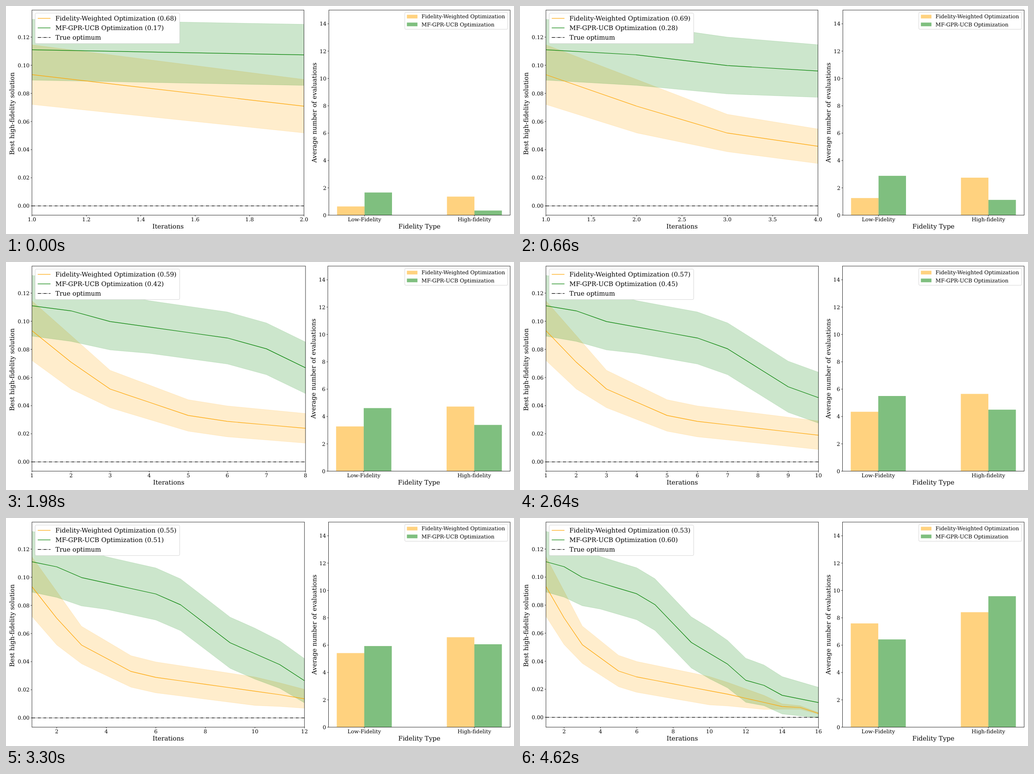
Write an HTML page that moves like this. It is 1116 by 502 pixels and loops after 6.28 s.

```html
<!DOCTYPE html>
<html lang="en">
<head>
<meta charset="utf-8">
<title>Multi-fidelity optimization</title>
<style>
  html, body { margin: 0; width: 100%; height: 100%; overflow: hidden; background: #fff; }
  svg {
    display: block; width: 1116px; height: 502px;
    font: 11.63px "DejaVu Serif", serif;
    font-variant-ligatures: none; text-rendering: geometricPrecision;
  }
  .big { font-size: 13.95px; }
  .mid { text-anchor: middle; }
  .end { text-anchor: end; }
  .axis { fill: none; stroke: #000; stroke-width: .8; }
  .box { fill: #fff; stroke: #ccc; stroke-width: .8; }
  .line { fill: none; stroke-width: 1.17; stroke-linejoin: round; }
  .band { fill-opacity: .2; stroke-opacity: .2; stroke-width: .78; }
  .bar { opacity: .5; }
  .dash { stroke: #000; stroke-dasharray: 7.44 1.86 1.16 1.86; }
</style>
</head>
<body>
<svg id="stage" viewBox="0 0 1116 502"></svg>
<script>
const STEP = 330, LOOP = 6280, LAST = 16;
const LEFT = 57, RIGHT = 1107.5, TOP = 9, BOTTOM = 460.6, EM = 11.63;
const HEIGHT = BOTTOM - TOP, MIDDLE = (TOP + BOTTOM) / 2;

// Key points by iteration: solution and its spread in 1e-4, and low-fidelity evaluations.
const series = [
  {
    name: 'Fidelity-Weighted Optimization', color: 'orange',
    mean: { 1: 933, 2: 709, 3: 518, 5: 330, 6: 288, 11: 165, 14: 77, 15: 70, 16: 28 },
    spread: { 1: 212, 2: 190, 3: 133, 5: 112, 10: 101, 13: 50, 14: 19, 16: 6 },
    low: { 2: .64, 4: 1.255, 6: 2.2, 12: 5.42, 14: 6.75, 16: 7.59 }
  },
  {
    name: 'MF-GPR-UCB Optimization', color: 'green',
    mean: { 1: 1110, 2: 1074, 3: 998, 6: 881, 7: 804, 9: 534, 11: 379, 12: 264, 13: 228, 14: 157, 16: 105 },
    spread: { 1: 216, 2: 217, 4: 187, 10: 181, 16: 109 },
    low: { 2: 1.66, 4: 2.88, 6: 3.73, 10: 5.5, 12: 5.935, 14: 6.23, 16: 6.42 }
  }
];

// Straight line between the key points on either side of n.
function at(keys, n) {
  if (n in keys) return keys[n];
  const xs = Object.keys(keys).map(Number), i = xs.findIndex(x => x > n);
  const a = xs[i - 1], b = xs[i];
  return keys[a] + (keys[b] - keys[a]) * (n - a) / (b - a);
}

const px = v => +v.toFixed(2);
const text = (x, y, str, cls = '') => `<text x="${px(x)}" y="${px(y)}" class="${cls}">${str}</text>`;
const path = (d, cls, attrs = '') => `<path d="${d}" class="${cls}" ${attrs}/>`;
const rect = (x, y, w, h, cls, attrs = '') =>
  `<rect x="${px(x)}" y="${px(y)}" width="${px(w)}" height="${px(h)}" class="${cls}" ${attrs}/>`;
const sideways = (x, y, str) =>
  `<text transform="translate(${px(x)} ${px(y)}) rotate(-90)" class="big mid">${str}</text>`;
const xTick = (x, str) => path(`M${px(x)} ${BOTTOM}v2.7`, 'axis') + text(x, 474.3, str, 'mid');
const yTick = (x, y, str) => path(`M${px(x)} ${px(y)}h-2.7`, 'axis') + text(x - 5.3, y + 4.2, str, 'end');
const frame = (x, right) => rect(x, TOP, right - x, HEIGHT, 'axis');

function xTicks(n) {
  const step = [.2, .25, .5, 1, 2].find(s => s >= (n - 1) / 9);
  const digits = step === .25 ? 2 : step < 1 ? 1 : 0;
  const ticks = [];
  for (let i = Math.ceil(1 / step); i * step <= n + 1e-6; i++) {
    ticks.push({ value: i * step, label: (i * step).toFixed(digits) });
  }
  return ticks;
}

// Half the width of a label centred on the right edge; the layout makes room for it.
function overhang(n, ticks) {
  const { value, label } = ticks[ticks.length - 1];
  if (value < n - 1e-6) return 0;
  return EM * .318 * (label.includes('.') ? label.length - .5 : label.length);
}

function linePlot(n, right, ticks) {
  const steps = Array.from({ length: n }, (_, i) => i + 1);
  const curve = (s, side) => steps.map(i => at(s.mean, i) + side * at(s.spread, i));

  // The y range holds all bands and zero, plus a 5% margin.
  const high = Math.max(...series.flatMap(s => curve(s, 1)));
  const low = Math.min(0, ...series.flatMap(s => curve(s, -1)));
  const scale = HEIGHT / (1.1 * (high - low));
  const x = v => LEFT + (v - 1) / (n - 1) * (right - LEFT);
  const y = v => BOTTOM - (v - low + .05 * (high - low)) * scale;
  const points = (s, side) => curve(s, side).map((v, i) => `${px(x(i + 1))} ${px(y(v))}`);

  let bands = '', lines = '', legend = rect(64, 15.7, 317.6, 67, 'box', 'rx="2.8"');
  series.forEach((s, i) => {
    const outline = [...points(s, 1), ...points(s, -1).reverse()].join('L');
    bands += path(`M${outline}Z`, 'band', `fill="${s.color}" stroke="${s.color}"`);
    lines += path('M' + points(s, 0).join('L'), 'line', `stroke="${s.color}"`);
    const row = 27.2 + 21 * i, share = (n - at(s.low, n)) / n;
    legend += path(`M69.7 ${row}h28`, 'line', `stroke="${s.color}"`)
      + text(108.4, row + 4.8, `${s.name} (${share.toFixed(2)})`, 'big');
  });
  lines += path(`M${LEFT} ${px(y(0))}H${px(right)}`, 'line dash');
  legend += path('M69.7 69.4h28', 'line dash') + text(108.4, 74.3, 'True optimum', 'big');

  let axes = frame(LEFT, right);
  ticks.forEach(t => axes += xTick(x(t.value), t.label));
  for (let v = 0; v <= 1200; v += 200) axes += yTick(LEFT, y(v), (v / 1e4).toFixed(2));

  return `<clipPath id="area">${rect(LEFT, TOP, right - LEFT, HEIGHT, '')}</clipPath>`
    + `<g clip-path="url(#area)">${bands}${lines}</g>` + axes + legend
    + text((LEFT + right) / 2, 490.2, 'Iterations', 'big mid')
    + sideways(18.4, MIDDLE + 2.2, 'Best high-fidelity solution');
}

function barPlot(n, left) {
  const unit = (RIGHT - left) / 1.65, width = unit / 4, perEval = HEIGHT / 15;
  const center = i => left + unit * (.325 + i);
  let bars = '', legend = rect(876, 14.2, 226.3, 37, 'box', 'rx="2.3"');
  series.forEach((s, i) => {
    const low = at(s.low, n), fill = `fill="${s.color}"`;
    [low, n - low].forEach((count, k) => {
      const h = count * perEval;
      bars += rect(center(k) + (i - 1) * width, BOTTOM - h, width, h, 'bar', fill);
    });
    const row = 23.3 + 17.2 * i;
    legend += rect(880.7, row - 4, 23.2, 8.1, 'bar', fill) + text(912.8, row + 4, s.name);
  });

  let axes = frame(left, RIGHT);
  ['Low-Fidelity', 'High-fidelity'].forEach((label, i) => axes += xTick(center(i), label));
  for (let v = 0; v <= 14; v += 2) axes += yTick(left, BOTTOM - v * perEval, v);

  return bars + axes + legend
    + text((left + RIGHT) / 2, 490.2, 'Fidelity Type', 'big mid')
    + sideways(left - 26.8, MIDDLE, 'Average number of evaluations');
}

const stage = document.getElementById('stage');
let shown = 0;

function draw(now) {
  const n = Math.min(LAST, 2 + Math.floor(now % LOOP / STEP));
  if (n !== shown) {
    shown = n;
    const ticks = xTicks(n), extra = overhang(n, ticks);
    stage.innerHTML = linePlot(n, 660.2 - .6 * extra, ticks) + barPlot(n, 705.5 + .4 * extra);
  }
  requestAnimationFrame(draw);
}
draw(performance.now());
</script>
</body>
</html>
```
